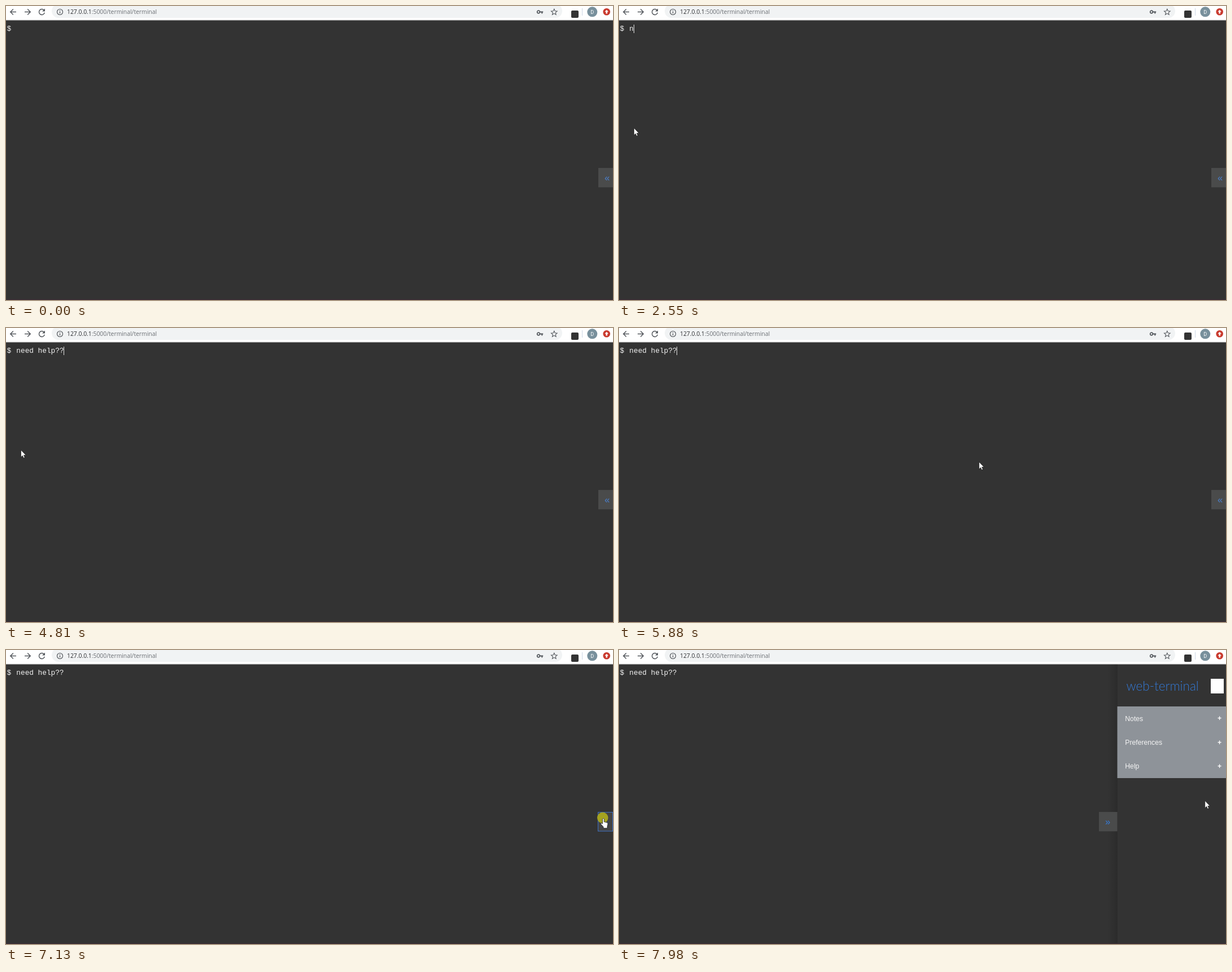
Animation, 1075 px wide and 521 px high, one loop 8 s. Source, as an HTML page:

```html
<!DOCTYPE html>
<html lang="en">
<head>
<meta charset="utf-8">
<title>Terminal</title>
<style>
  html, body { margin: 0; width: 1075px; height: 521px; overflow: hidden; background: #333; }
  svg { display: block; }
  .mono { font: 12.75px "Liberation Mono", "Courier New", monospace; fill: #f2f2f2; }
  .sans { font: 12.2px "Liberation Sans", Arial, sans-serif; fill: #f4f4f4; }
  .plus { font-weight: bold; fill: #fff; }
  .url { font: 10.35px "Open Sans", "Noto Sans", sans-serif; fill: #6a6e73; }
  .title { font: 300 22.5px Lato, sans-serif; fill: #3478d4; }
  .chevron { font: 16.5px "Liberation Sans", Arial, sans-serif; fill: #4a80cf; text-anchor: middle; }
  .icon { fill: none; stroke: #55595e; stroke-width: 1.5; }
</style>
</head>
<body>
<svg width="1075" height="521" viewBox="0 0 1075 521">
  <defs>
    <linearGradient id="shade">
      <stop offset="0" stop-color="#000" stop-opacity="0"/>
      <stop offset="1" stop-color="#000" stop-opacity=".15"/>
    </linearGradient>
  </defs>

  <rect width="1075" height="521" fill="#333"/>
  <rect y="519.5" width="1075" height="1.5" fill="#3b2d34"/>

  <!-- browser bar -->
  <rect width="1075" height="25" fill="#fff"/>
  <rect y="24.5" width="1075" height="1" fill="#c9c9c9"/>
  <rect x="81" y="-3" width="904" height="24" rx="12" fill="#f1f3f4"/>
  <g class="icon">
    <path d="M18 10.5H8M12.8 5.5l-5 5 5 5"/>
    <path d="M33 10.5h10M38.200 5.500l5 5-5 5"/>
    <path d="M67.300 7.300A5 5 0 1 0 68.300 11.800"/>
    <path d="M69 4.500v5h-5z" fill="#55595e" stroke="none"/>
    <circle cx="95.500" cy="10.500" r="5" stroke-width="1.200"/>
    <path d="M95.500 9.700v3.500M95.500 7.300v1.400" stroke-width="1.300"/>
    <circle cx="943" cy="10.500" r="2.300" stroke-width="1.700"/>
    <path d="M945.500 10.500h5.700M949.300 10.500v3" stroke-width="1.900"/>
    <path d="M970.800 5.300l1.500 3.500 3.800.3-2.900 2.500.9 3.700-3.300-2-3.300 2 .9-3.700-2.900-2.500 3.800-.3z" stroke-width="1.100"/>
  </g>
  <text class="url" x="108" y="14.300"><tspan fill="#2b2d30">127.0.0.1</tspan>:5000/terminal/terminal</text>
  <rect x="1001" y="8" width="13" height="13" rx="2" fill="#333"/>
  <rect x="1020" y="4" width="1" height="13" fill="#ccd6e4"/>
  <circle cx="1038.300" cy="10.300" r="9" fill="#78909c"/>
  <text x="1038.300" y="13.600" font-family="Roboto, sans-serif" font-size="9" fill="#fff" text-anchor="middle">D</text>
  <circle cx="1063.700" cy="10.300" r="6.300" fill="#c93a2e"/>
  <path d="M1063.700 6.700l3.300 3.600h-2v3.200h-2.600v-3.200h-2z" fill="#fff"/>

  <!-- terminal line -->
  <text class="mono" x="1.500" y="44">$</text>
  <text class="mono" id="typed" x="18.350" y="44"></text>
  <rect id="caret" y="33" width="1" height="15" fill="#e4e4e4"/>

  <!-- side panel -->
  <g id="panel">
    <rect x="865" y="25.500" width="18" height="494" fill="url(#shade)"/>
    <text class="title" x="898.500" y="72">web-terminal</text>
    <rect x="1048" y="51" width="23" height="26" fill="#fff"/>
    <rect x="882.500" y="100" width="192.500" height="127" fill="#8e9399"/>
    <g id="menu"></g>
  </g>
  <g id="toggle">
    <rect id="face" x=".5" y="287" width="32.500" height="34.300"/>
    <rect id="ring" x="0" y="287.500" width="26" height="33.500" fill="none" stroke="#3c70c4"/>
    <text class="chevron" id="chevron" x="16" y="309.500"></text>
  </g>

  <!-- pointer -->
  <circle id="click" r="9.700" fill="#a4a220"/>
  <g id="pointer">
    <path id="arrow" d="M.4.600V13.500L3.300 10.800 5.100 15 7.300 14 5.500 9.900H9.400Z" fill="#fff" stroke="#1c1c1c" stroke-width=".8"/>
    <path id="beam" d="M-2.500-6.500h2L0-6l.5-.5h2M0-6V6M-2.500 6.500h2L0 6l.5.500h2" fill="none" stroke="#dedede"/>
    <path id="hand" d="M-.6 2.500Q.8.500 2.200 2.500V7.500L7.300 8.700Q9.200 9.300 8.900 11.300L7.900 15.500V18.800H1V16.500L-3.500 11.500Q-3.800 9.400-1.900 9.800L-.6 11Z" fill="#fff" stroke="#1c1c1c" stroke-width=".8"/>
  </g>
</svg>
<script>
const LOOP = 8000;
const $ = id => document.getElementById(id);
const show = (id, on) => $(id).setAttribute('visibility', on ? 'visible' : 'hidden');
const move = (id, x, y) => $(id).setAttribute('transform', `translate(${x} ${y})`);
const within = (t, a, b) => t >= a && t < b;

const line = 'need help??';
const keys = [2550, 2630, 2860, 3010, 3090, 3240, 3390, 4020, 4170, 4640, 4810];
const caretOff = [[2080, 2550], [3940, 4020], [5350, 5880], [6420, 6880]];
const clicks = [[1530, 1620, 20, 38], [7130, 7200, 1056.7, 297.3]];
const OPEN = 7200;

// Pointer moves in steps; each one starts where the last ended unless it has its own "from".
const ease = p => p * (2 - p);
const moves = [
  { at: 210, end: 290, n: 2, to: [178, 219] },
  { at: 530, end: 840, n: 5, to: [22, 21], ease },
  { at: 990, end: 1380, n: 6, from: [22.3, 28.5], to: [21.8, 39] },
  { at: 1850, end: 2080, n: 4, to: [26, 215.500], ease },
  { at: 5500, end: 5650, n: 3, to: [495, 224], lift: 26 },
  { at: 5880, end: 6350, n: 7, to: [1031, 271.5], ease },
  { at: 6420, end: 6650, n: 4, to: [1056, 293.5] },
  { at: 6730, end: 6880, n: 3, to: [1057, 297] },
  { at: 7830, end: 7980, n: 3, to: [1037.3, 266.5] }
];

function pointerAt(t) {
  let pos = [794, 755];
  for (const m of moves) {
    if (t < m.at) break;
    const gap = (m.end - m.at) / (m.n - 1);
    const k = Math.min(m.n, Math.floor((t - m.at + 6) / gap) + 1);
    const p = (m.ease || (v => v))(k / m.n);
    const from = m.from || pos;
    pos = from.map((v, i) => v + (m.to[i] - v) * p);
    pos[1] -= (m.lift || 0) * 4 * p * (1 - p);
  }
  return pos;
}

function draw(t) {
  const typed = keys.filter(k => t >= k).length;
  $('typed').textContent = line.slice(0, typed);
  $('caret').setAttribute('x', Math.floor(18.35 + 7.65 * typed));
  show('caret', within(t, 1620, 7130) && !caretOff.some(([a, b]) => within(t, a, b)));

  const [x, y] = pointerAt(t);
  const open = t >= OPEN;
  const hover = !open && x >= 1049 && within(y, 287, 321);
  const beam = within(t, 990, 1850);
  move('pointer', x, y);
  show('arrow', !hover && !beam);
  show('beam', beam);
  show('hand', hover);

  const click = clicks.find(([a, b]) => within(t, a, b));
  show('click', click);
  if (click) move('click', click[2], click[3]);

  show('panel', open);
  move('toggle', open ? 849.5 : 1048.5, 0);
  show('ring', within(t, 7130, OPEN));
  $('face').setAttribute('fill', hover ? '#444' : '#4a4b4b');
  $('chevron').textContent = open ? '»' : '«';
  $('chevron').style.fill = hover ? '#3a4a66' : open ? '#347cdb' : '';
}

$('menu').innerHTML = ['Notes', 'Preferences', 'Help'].map((name, i) =>
  `<text class="sans" x="896.300" y="${126 + 42.2 * i}">${name}</text>` +
  `<text class="sans plus" x="1060" y="${125.3 + 42.2 * i}">+</text>`).join('');

const start = performance.now();
function tick() {
  draw((performance.now() - start) % LOOP);
  requestAnimationFrame(tick);
}
tick();
</script>
</body>
</html>
```
